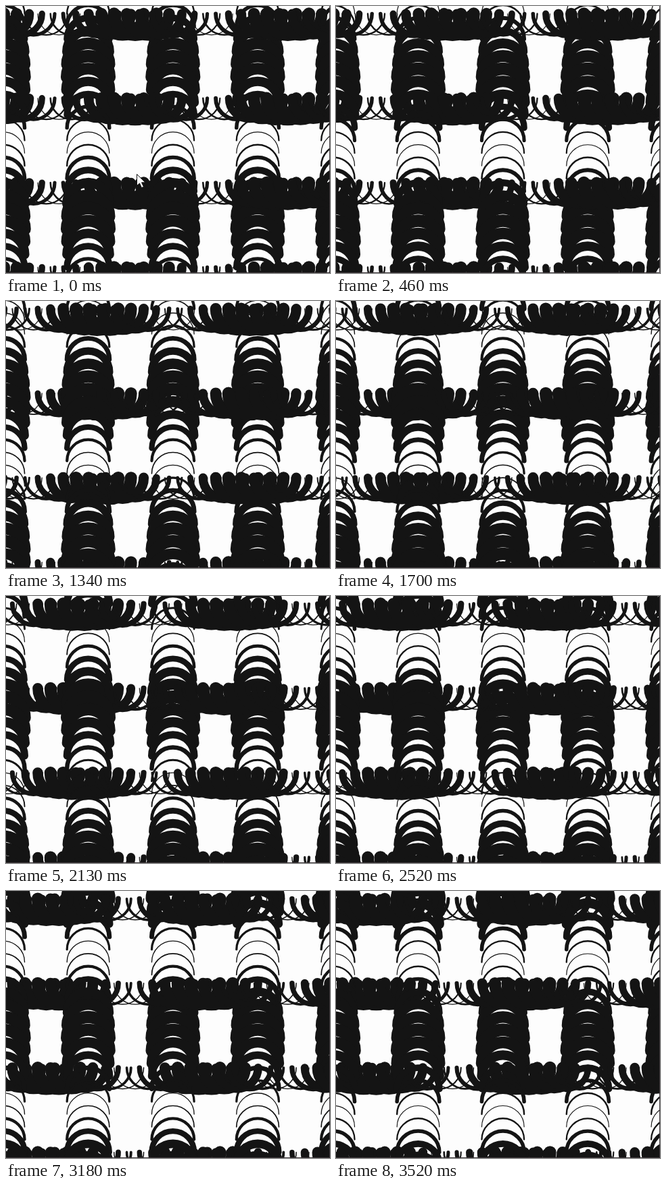
Recreate the animation shown at these times as an HTML page. Size 479 px wide and 396 px high, loop 3620 ms.

```html
<!DOCTYPE html>
<html lang="en">
<head>
<meta charset="utf-8">
<title>Arc weave</title>
<style>
html, body { margin: 0; width: 100%; height: 100%; overflow: hidden; background: #fdfdfd; }
svg { display: block; }
</style>
</head>
<body>
<svg width="479" height="396" viewBox="0 0 479 396">
  <rect width="479" height="396" fill="#fdfdfd"/>
  <g id="arcs" fill="none" stroke="#141414" stroke-linecap="round"></g>
  <path d="M0 395.5H478.5V0" fill="none" stroke="#3a3437"/>
  <path id="pointer" d="M193.5 249.5v17l4-3.6 3 6.6 3-1.3-3-6.4h5.5z" fill="#fff" stroke="#141414"/>
</svg>
<script>
const LOOP = 3620;
const CELL = 125.3, STEP = CELL * 0.15, R = CELL / 4;
const X0 = 3.1, Y0 = 11.5, COL0 = -3.8;
const PERIOD = STEP * 12;          // each arc is 30 degrees further along the wave
const SPEED = PERIOD / 6000;       // one degree per 60 Hz tick
const THIN = 1.2, THICK = 18.5;

const layer = document.getElementById('arcs');
const pointer = document.getElementById('pointer');

function halfRing(x, y, sweep) {
  return `M${(x - R).toFixed(2)} ${y.toFixed(2)}a${R} ${R} 0 0 ${sweep} ${2 * R} 0`;
}

function addPath(d) {
  const path = document.createElementNS('http://www.w3.org/2000/svg', 'path');
  path.setAttribute('d', d);
  layer.appendChild(path);
  return path;
}

// All arcs that share a weight form one path.
const rows = [], cols = [];
for (let i = -3; i < 30; i++) {
  const x = X0 + i * STEP, y = Y0 + i * STEP;
  let cups = '', caps = '';
  for (let k = 0; k < 5; k++) {
    cups += halfRing(x, Y0 + k * CELL, 0);
    caps += halfRing(COL0 + k * CELL, y, 1);
  }
  rows.push({ pos: x, path: addPath(cups) });
  cols.push({ pos: y, path: addPath(caps) });
}

function setWeights(list, thinnest) {
  for (const { pos, path } of list) {
    const wave = (1 - Math.cos((pos - thinnest) / PERIOD * 2 * Math.PI)) / 2;
    path.setAttribute('stroke-width', (THIN + (THICK - THIN) * wave).toFixed(2));
  }
}

function draw(t) {
  setWeights(rows, 302 - SPEED * t);
  setWeights(cols, 217.8 + SPEED * t);
  pointer.style.display = t < 40 ? '' : 'none';
}

const start = performance.now();
function tick() {
  draw((performance.now() - start) % LOOP);
  requestAnimationFrame(tick);
}
draw(0);
requestAnimationFrame(tick);
</script>
</body>
</html>
```
